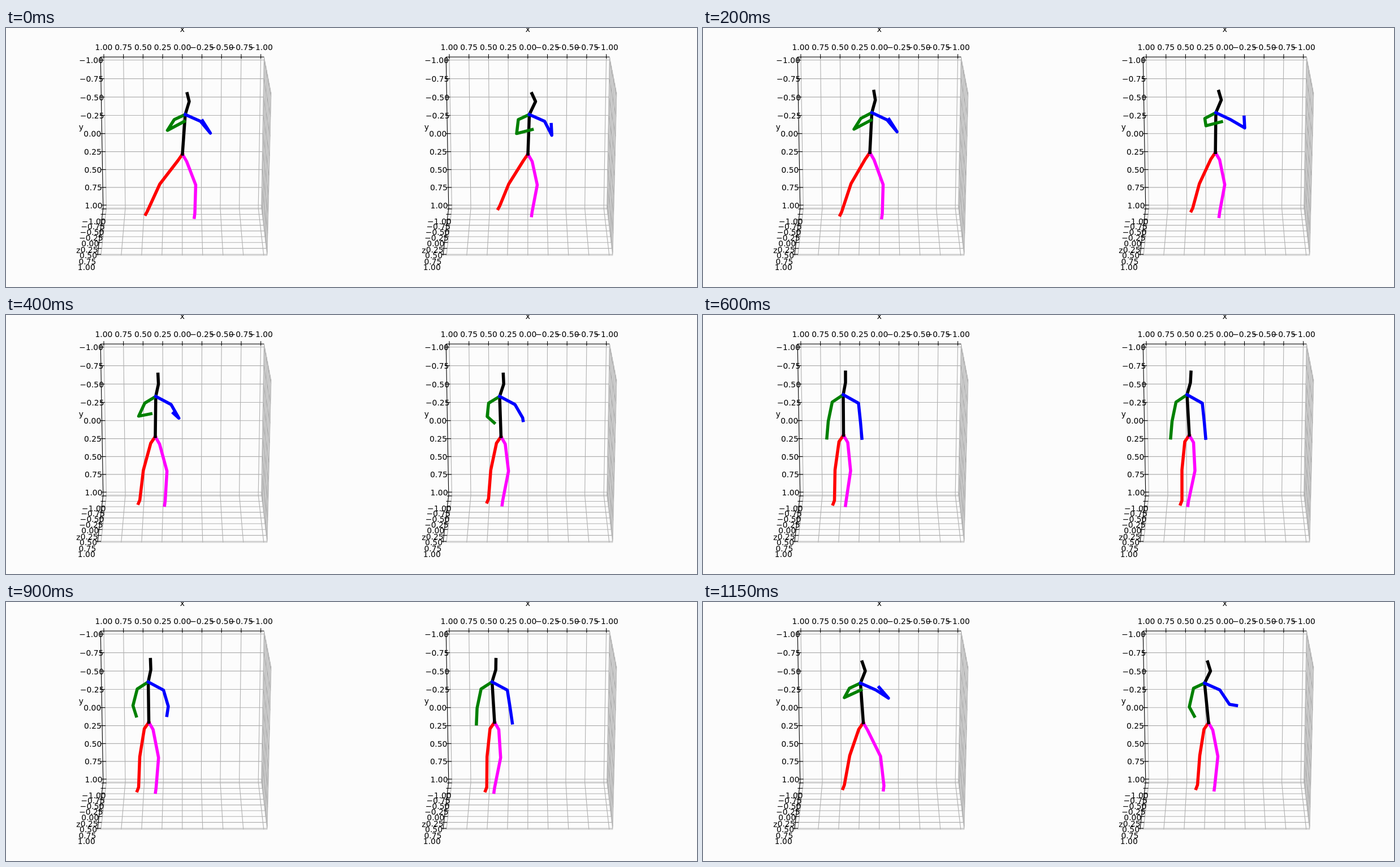
Animation, 1222 px wide and 458 px high, one loop 1200 ms. Source, as an HTML page with a canvas:

```html
<!DOCTYPE html>
<html lang="en">
<head>
<meta charset="utf-8">
<title>Two walking skeletons</title>
<style>
  html, body { margin: 0; width: 100%; height: 100%; overflow: hidden; background: #fcfcfc; }
  canvas { display: block; }
</style>
</head>
<body>
<canvas id="stage" width="1222" height="458"></canvas>
<script>
const ctx = document.getElementById('stage').getContext('2d');
const LOOP = 1200, STEP = 50;
const LIM = 1 + 1 / 24;
const TICKS = Array.from({ length: 9 }, (_, i) => i / 4 - 1);

function path(points, color, width) {
  ctx.beginPath();
  points.forEach(p => ctx.lineTo(p[0], p[1]));
  ctx.strokeStyle = color;
  ctx.lineWidth = width;
  ctx.stroke();
}

// ---- plot box ----

function project(cx, x, y, z) {
  const u = y / LIM, w = z / LIM;
  const scale = (147.9 - 2.9 * u + 5.6 * w - 0.6 * u * w) / LIM;
  const back = 186.7 + 128.2 * y - 1.7 * y * y;
  const front = 260.7 + 137.8 * y - 2 * y * y;
  const mix = (w + 1) / 2;
  return [cx - x * scale, back + (front - back) * mix + 1.3 * (z * z - LIM * LIM)];
}

function drawBox(cx) {
  const L = LIM;
  const at = (x, y, z) => project(cx, x, y, z);
  const line = (color, ...pts) => path(pts.map(p => at(...p)), color, 1.11);
  const dash = (x, y, dx, dy) => path([[x - 3 * dx, y - 5 * dy], [x + 6 * dx, y + 3 * dy]], '#000', 1.11);
  const label = (text, x, y) => ctx.fillText(text, x, Math.round(y));

  line('#cccccc', [L, -L, -L], [-L, -L, -L], [-L, L, -L], [L, L, -L]);
  line('#cccccc', [-L, -L, -L], [-L, -L, L], [-L, L, L], [-L, L, -L]);
  line('#cccccc', [-L, L, L], [L, L, L]);
  for (const v of TICKS) {
    line('#b0b0b0', [v, -L, -L], [v, L, -L], [v, L, L]);
    line('#b0b0b0', [L, v, -L], [-L, v, -L], [-L, v, L]);
    line('#b0b0b0', [-L, -L, v], [-L, L, v], [L, L, v]);
  }
  line('#000', [-L, -L, -L], [L, -L, -L], [L, L, -L], [L, L, L]);

  ctx.fillStyle = '#000';
  for (const v of TICKS) {
    const text = v.toFixed(2).replace('-', '\u2212');
    const [xx, xy] = at(v, -L, -L);
    const [yx, yy] = at(L, v, -L);
    const [zx, zy] = at(L, L, v);
    dash(xx, xy, 0, 1);
    dash(yx, yy, 1, 0);
    dash(zx, zy, 1, 0);
    label(text, xx, 39);
    label(text, yx - 16.7, yy + 5.5);
    label(text, zx - 18 - 1.7 * v, zy + 27.5 + 0.6 * v);
  }
  label('x', cx, 7);
  label('y', cx - 179, 180);
  label('z', cx - 184, 398);
}

// ---- skeletons ----

const ramp = (t, from, to) => Math.min(1, Math.max(0, (t - from) / (to - from)));
const smooth = s => s * s * (3 - 2 * s);
const add = (p, dx, dy) => [p[0] + dx, p[1] + dy];

// Every triple reads: standing, lunge at the start, lunge at the end.
const blend = ([stand, first, last], [a, b]) => stand + (first - stand) * a + (last - stand) * b;

// Arms hang alike in both figures: upper arm, forearm.
const hang = { right: [[-7, 34], [-2.5, 29.5]], left: [[3.5, 33.5], [2.5, 28.5]] };

const figures = [
  {
    x: [248.5, 312, 283.5], spine: [-0.5, 5, -5], neck: [4, 7, 8.5], head: [0, -3.5, -5.5],
    backLeg: { thigh: [-7, -32, -16], shin: [-1, -22.5, -9.5], lift: 5 },
    frontLeg: { thigh: [5, 16, 23], shin: [-8, -1.5, 6], lift: 4 },
    right: [[[-12, 19], [-9, 16.5]], [[30, -16], [29.5, -13.5]]],
    left: [[[17.5, 21], [22.5, 14.5]], [[-14, -22], [-16.5, -19]]],
    windup: 1,
    lower: t => 1 - smooth(ramp(t, 300, 600)),
    raise: t => smooth(ramp(t, 800, 1100))
  },
  {
    x: [860, 923, 894], spine: [-4, 2.5, -7], neck: [6, 11, 10.5], head: [1, -6.5, -5],
    backLeg: { thigh: [-5, -26, -7.5], shin: [0, -16, -4], lift: 15 },
    frontLeg: { thigh: [2.5, 9, 9], shin: [-11.5, -9, -5.5], lift: 7 },
    right: [[[2, 13], [-7.5, 33]], [[27.5, -7], [9, 16.5]]],
    left: [[[24, 14], [17, 25.5]], [[-1, -19], [12.5, 2]]],
    windup: 0.45,
    lower: t => 1 - smooth(ramp(t, 200, 600)),
    raise: t => ramp(t, 770, 1150) ** 2
  }
];

function drawLeg(color, hip, leg, foot, stride, swing, root) {
  const [a, b] = stride;
  const knee = add(hip, blend(leg.thigh, swing), 50 - 8.5 * a - 3.5 * b);
  const ankle = add(knee, blend(leg.shin, swing), 54 - leg.lift * a - 2 * b);
  path([root, hip, knee, ankle, add(ankle, ...foot)], color, 5.5);
}

function drawArm(color, chest, shoulder, rest, reach, swing, windup) {
  const joints = [chest, shoulder];
  rest.forEach((bone, i) => {
    const weights = i ? swing : [swing[0] * windup, swing[1]];
    const move = [0, 1].map(k => blend([bone[k], reach[i][0][k], reach[i][1][k]], weights));
    joints.push(add(joints[i + 1], ...move));
  });
  path(joints, color, 5.5);
}

function drawFigure(f, t) {
  const a = 1 - smooth(ramp(t, 0, 590)), b = ramp(t, 770, 1150) ** 2;
  const stride = [a, b], swing = [f.lower(t), f.raise(t)];
  const windup = f.windup + (1 - f.windup) * ramp(t, 0, 200);

  const root = [blend(f.x, stride), 212.5 + 10.5 * a + b];
  const chest = add(root, blend(f.spine, stride), -71.5 + 1.5 * (a + b));
  const neck = add(chest, blend(f.neck, stride), -21.5 - 1.5 * a);
  const head = add(neck, blend(f.head, stride), -18.5 + 4.5 * a + 2.5 * b);

  drawLeg('#ff0000', add(root, -8, 11.5), f.backLeg, [-2.5, 6.5 - 2 * a], stride, stride, root);
  drawLeg('#ff00ff', add(root, 7.5, 13), f.frontLeg, [-1, 7.5], stride, swing, root);
  path([root, chest, neck, head], '#000', 5.5);
  drawArm('#008000', chest, add(chest, -19.5, 13 - 4 * a - 4 * b), hang.right, f.right, swing, windup);
  drawArm('#0000ff', chest, add(chest, 27, 15 - 3 * a - 3 * b), hang.left, f.left, swing, windup);
}

function draw(now) {
  const t = Math.floor((now % LOOP) / STEP) * STEP;
  ctx.fillStyle = '#fcfcfc';
  ctx.fillRect(0, 0, 1222, 458);
  ctx.font = '13.89px "DejaVu Sans", sans-serif';
  ctx.textAlign = 'center';
  ctx.lineJoin = 'round';
  ctx.lineCap = 'butt';
  drawBox(311.8);
  drawBox(922.8);
  ctx.lineCap = 'square';
  figures.forEach(f => drawFigure(f, t));
}

const start = performance.now();
function tick() {
  draw(performance.now() - start);
  requestAnimationFrame(tick);
}
tick();
</script>
</body>
</html>
```
